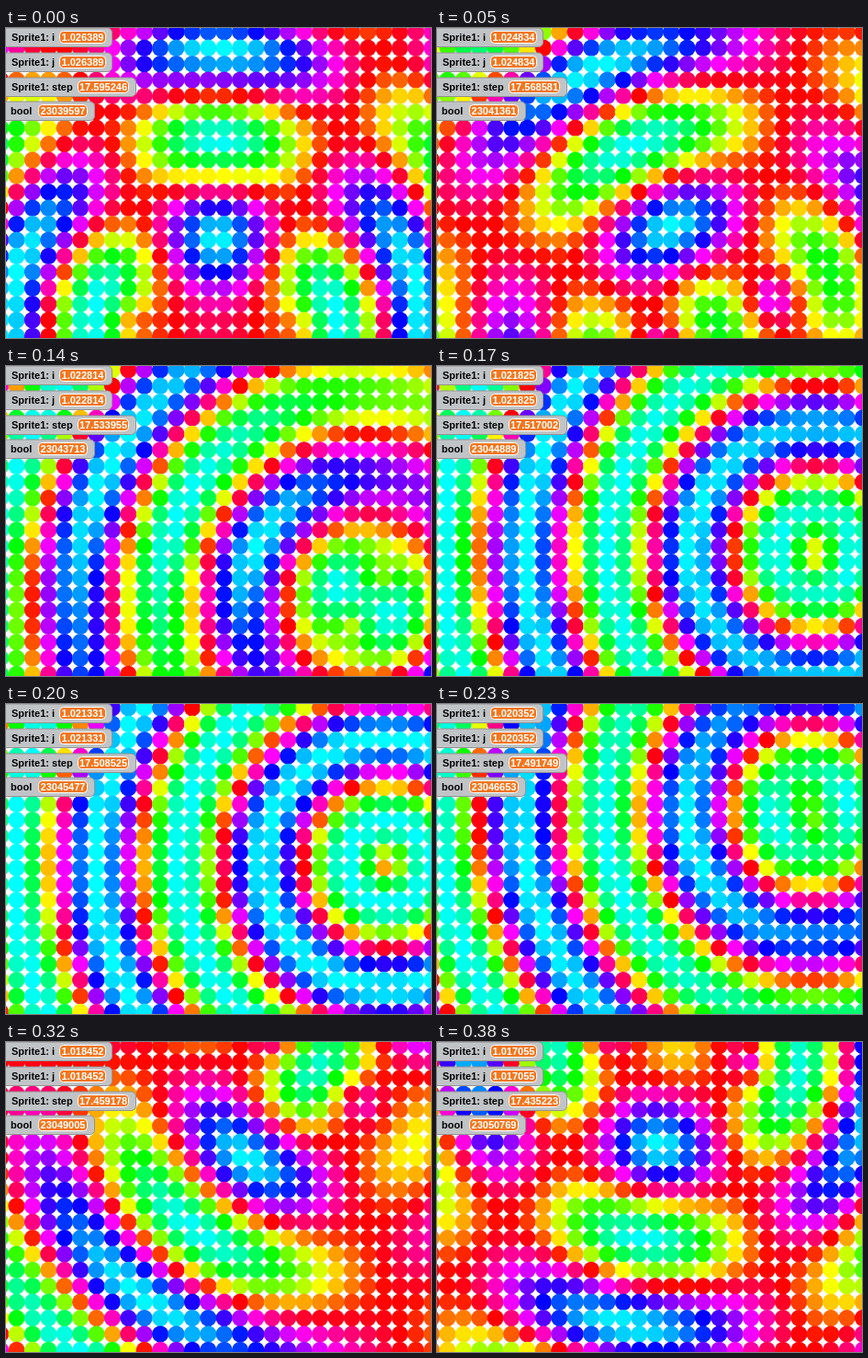
Write an HTML page with a canvas that moves like this. It is 463 px wide and 337 px high and loops after 410 ms.

```html
<!DOCTYPE html>
<html>
<head>
<meta charset="utf-8">
<style>
  html, body { margin: 0; width: 100%; height: 100%; overflow: hidden; background: #fff; }
  canvas { display: block; }
</style>
</head>
<body>
<canvas id="stage" width="463" height="337"></canvas>
<script>
const ctx = document.getElementById('stage').getContext('2d');
const LOOP = 410, PITCH = 17.4, DOT = 9.1;
const CENTER = { x: 231.5, y: 168.5 }, ORBIT = 184, WAVE = 181;
const TAU = Math.PI * 2;

// Values of the step variable at known ticks, linear in between
const TICKS = [0, 3, 7, 10, 13, 16, 19];
const STEPS = [17.595246, 17.568581, 17.533955, 17.508525, 17.483361, 17.459178, 17.435223];

function stepAt(tick) {
  const k = Math.max(1, TICKS.findIndex(t => t >= tick));
  const f = (tick - TICKS[k - 1]) / (TICKS[k] - TICKS[k - 1]);
  return STEPS[k - 1] + (STEPS[k] - STEPS[k - 1]) * f;
}

function orbit(degrees) {
  const a = degrees * Math.PI / 180;
  return { x: CENTER.x + ORBIT * Math.cos(a), y: CENTER.y + ORBIT * Math.sin(a) };
}

function ripple(source, x, y) {
  return Math.sin(Math.hypot(x - source.x, y - source.y) * TAU / WAVE);
}

// Two circular waves interfere; one source orbits twice as fast as the other
function drawDots(tick) {
  const angle = 61 - 6 * tick;
  const slow = orbit(angle), fast = orbit(2 * angle);
  for (let row = 0; row < 20; row++) {
    for (let col = -1; col < 27; col++) {
      const x = 11.5 + col * PITCH, y = 4.3 + row * PITCH;
      const hue = 90 * (ripple(slow, x, y) + ripple(fast, x, y));
      ctx.fillStyle = `hsl(${(hue + 360) % 360}, 100%, 50%)`;
      ctx.beginPath();
      ctx.arc(x, y, DOT, 0, TAU);
      ctx.fill();
    }
  }
}

function box(x, y, w, h, radius, fill, stroke) {
  ctx.beginPath();
  ctx.roundRect(x, y, w, h, radius);
  ctx.fillStyle = fill;
  ctx.fill();
  ctx.strokeStyle = stroke;
  ctx.stroke();
}

function drawMonitor(y, right, label, labelX, valueX, valueW, value) {
  box(-9.5, y - 10, right + 9, 20.5, 5, '#c1c4c7', '#949191');
  box(valueX + 0.5, y - 6.5, valueW, 13, 4, '#f3761d', '#fff');
  ctx.textAlign = 'left';
  ctx.fillStyle = '#000';
  ctx.fillText(label, labelX, y + 4);
  ctx.textAlign = 'center';
  ctx.fillStyle = '#fff';
  ctx.fillText(value, valueX + 0.5 + valueW / 2, y + 4);
}

function draw(now) {
  const t = now % LOOP;
  const frame = t < 30 ? 0 : Math.floor((t + 10) / 30);
  const tick = Math.min(19, Math.max(0, Math.round(1.5 * frame - 0.5)));
  const step = stepAt(tick), ratio = (step * 7 / 120).toFixed(6);

  ctx.fillStyle = '#fff';
  ctx.fillRect(0, 0, 463, 337);
  drawDots(tick);

  ctx.font = 'bold 11px "Liberation Sans", Arial, sans-serif';
  ctx.lineWidth = 1;
  drawMonitor(10, 116, 'Sprite1: i', 6, 58, 50, ratio);
  drawMonitor(37, 116, 'Sprite1: j', 6, 58, 50, ratio);
  drawMonitor(64, 142, 'Sprite1: step', 6, 78, 55, step.toFixed(6));
  drawMonitor(90, 97, 'bool', 5, 35, 53, String(23039597 + 588 * tick));
  requestAnimationFrame(() => draw(performance.now() - start));
}

const start = performance.now();
draw(0);
</script>
</body>
</html>
```
